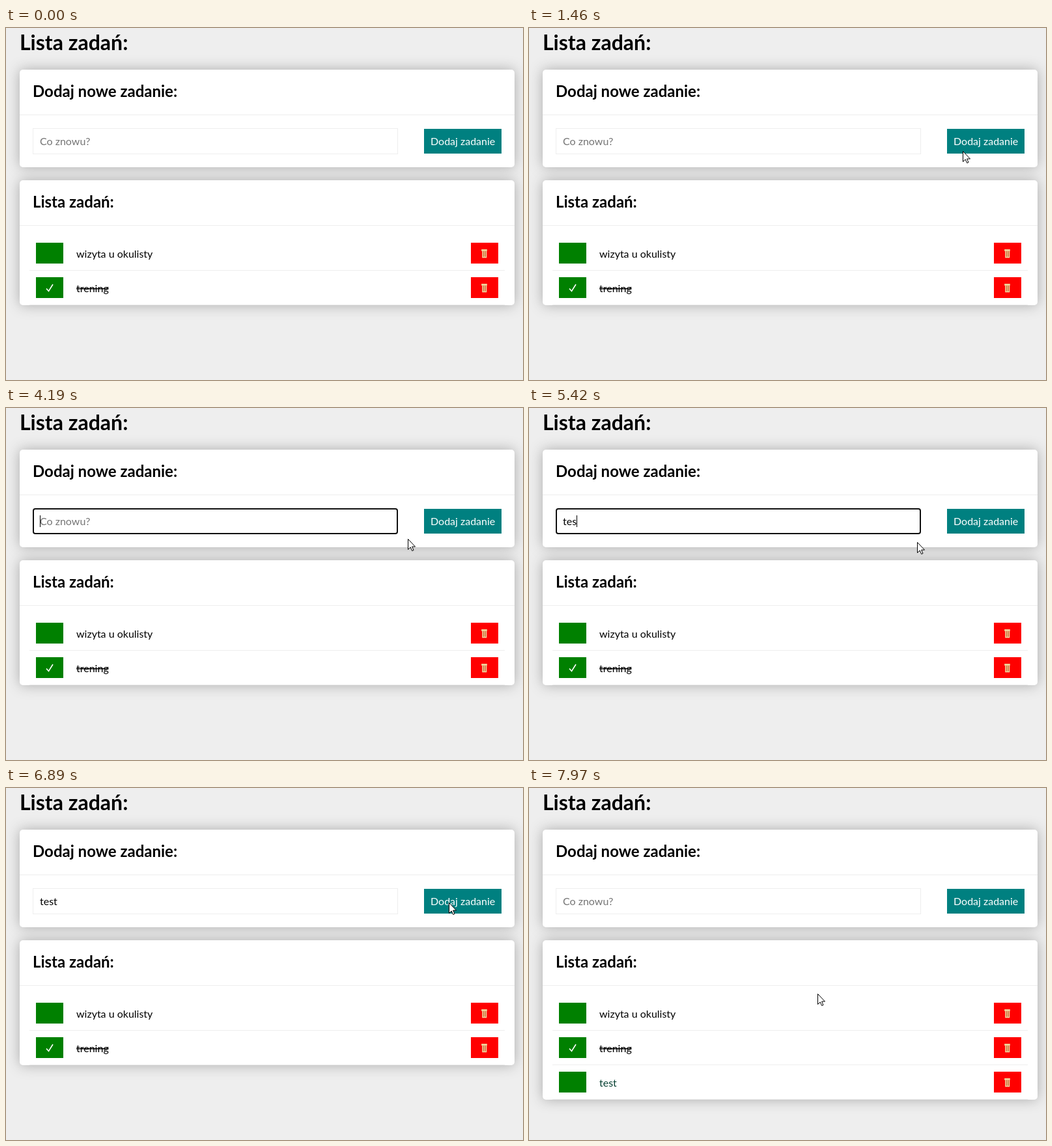
An HTML page for the animation above (8 s loop, 794 by 541 pixels).

```html
<!DOCTYPE html>
<html lang="pl">
<head>
<meta charset="utf-8">
<title>Lista zadań</title>
<style>
  html, body { margin: 0; width: 100%; height: 100%; overflow: hidden; background: #eee; }
  svg { display: block; width: 100vw; height: 100vh; }
  text { font: 16px Lato, sans-serif; white-space: pre; }
  .h1 { font-size: 32px; font-weight: 700; }
  .h2 { font-size: 24px; font-weight: 700; }
  .card { fill: #fff; filter: drop-shadow(0 0 10px #aaa); }
  .line { fill: #eee; }
  .done { text-decoration: line-through; }
</style>
</head>
<body>
<svg viewBox="0 0 794 541">
  <defs>
    <g id="bin">
      <path d="M730.5 340.5h8v2h-8z" fill="#ffd9a0" stroke="#e8c08a"/>
      <path d="M732 343v9.5h5.500V343" fill="#c8642c" stroke="#f4d6a4" stroke-width="1.500"/>
      <path d="M734.700 343v9" stroke="#ffe6bd"/>
    </g>
  </defs>
  <rect width="794" height="541" fill="#eee"/>
  <text class="h1" x="21" y="34">Lista zadań:</text>

  <rect class="card" x="21" y="64" width="760" height="150" rx="5"/>
  <text class="h2" x="41" y="106">Dodaj nowe zadanie:</text>
  <rect class="line" x="21" y="133" width="760" height="1"/>
  <rect id="field" fill="#fff"/>
  <text id="value" x="52" y="180"></text>
  <rect id="caret" y="165" width="1" height="18"/>
  <rect x="642" y="155" width="119" height="38" fill="teal"/>
  <text x="652" y="180" fill="#fff">Dodaj zadanie</text>

  <rect id="list" class="card" x="21" y="234" width="760" height="192" rx="5"/>
  <text class="h2" x="41" y="276">Lista zadań:</text>
  <rect class="line" x="21" y="303" width="760" height="1"/>
  <g id="rows"></g>

  <path id="cursor" d="M.5 .5V16.500L4.200 13L6.700 18.500L9 17.500L6.600 12.100H11.500Z" fill="#fff" stroke="#000"/>
</svg>
<script>
const LOOP = 8000, FOCUS = 2000, BLUR = 6890, ADD = 6950, BLINK = 530;
const WORD = 'test', KEYS = [5000, 5140, 5420, 5540];

// Each move: start, end, number of steps, bend point, target.
const START = [376, 541];
const MOVES = [
  [720, 1460, 12, [560, 290], [666, 189]],
  [1530, 1730, 3, [670, 185], [673, 180]],
  [4050, 4330, 5, [621, 202], [596, 206]],
  [6010, 6620, 10, [686, 193], [680, 176]],
  [7620, 7970, 6, [590, 225], [443, 316]]
];

const $ = id => document.getElementById(id);
const set = (el, attrs) => { for (const k in attrs) el.setAttribute(k, attrs[k]); };

function row(i, label, done, color) {
  const g = document.createElementNS('http://www.w3.org/2000/svg', 'g');
  g.setAttribute('transform', `translate(0 ${i * 53})`);
  g.innerHTML = `
    <rect x="46" y="330" width="42" height="32" fill="green"/>
    ${done ? '<path d="M62 347.500L65.500 351.500L72 341" fill="none" stroke="#fff" stroke-width="1.600"/>' : ''}
    <text class="${done ? 'done' : ''}" x="108" y="353" fill="${color}">${label}</text>
    <rect x="714" y="330" width="42" height="32" fill="red"/>
    <use href="#bin"/>
    <rect class="line" x="36" y="372" width="730" height="1"/>`;
  $('rows').append(g);
  return g;
}

row(0, 'wizyta u okulisty', false, '#000');
row(1, 'trening', true, '#000');
const added = row(2, WORD, false, '#064032');

function pointer(t) {
  let from = START;
  for (const [i, [t0, t1, n, bend, to]] of MOVES.entries()) {
    if (t < t0) break;
    const step = Math.floor((t - t0) / (t1 - t0) * (n - 1) + 1e-6) + 1;
    const u = Math.min(1, step / n);
    const e = i ? u * u * (3 - 2 * u) : 1 - (1 - u) ** 1.6;
    const a = from;
    from = to.map((v, j) => Math.round((1 - e) ** 2 * a[j] + 2 * e * (1 - e) * bend[j] + e * e * v));
  }
  return from;
}

function draw(t) {
  const focused = t >= FOCUS && t < BLUR;
  set($('field'), focused
    ? { x: 42, y: 155, width: 559, height: 38, rx: 3, stroke: '#101010', 'stroke-width': 2 }
    : { x: 41.5, y: 154.5, width: 560, height: 39, rx: 0, stroke: '#eee', 'stroke-width': 1 });

  const pressed = KEYS.filter(k => t >= k);
  const typed = t < ADD ? WORD.slice(0, pressed.length) : '';
  const value = $('value');
  value.textContent = typed || 'Co znowu?';
  set(value, { fill: typed ? '#000' : '#757575' });

  const since = t - (pressed.at(-1) ?? FOCUS);
  const lit = focused && Math.floor(since / BLINK) % 2 === 0;
  const width = typed ? value.getComputedTextLength() : 0;
  set($('caret'), { x: 52 + Math.floor(width), visibility: lit ? 'visible' : 'hidden' });

  const grown = t >= ADD;
  set($('list'), { height: grown ? 245 : 192 });
  set(added, { visibility: grown ? 'visible' : 'hidden' });

  set($('cursor'), {
    transform: `translate(${pointer(t)})`,
    visibility: t < MOVES[0][0] ? 'hidden' : 'visible'
  });
}

const origin = performance.now();
function tick() {
  draw((performance.now() - origin) % LOOP);
  requestAnimationFrame(tick);
}
tick();
</script>
</body>
</html>
```
